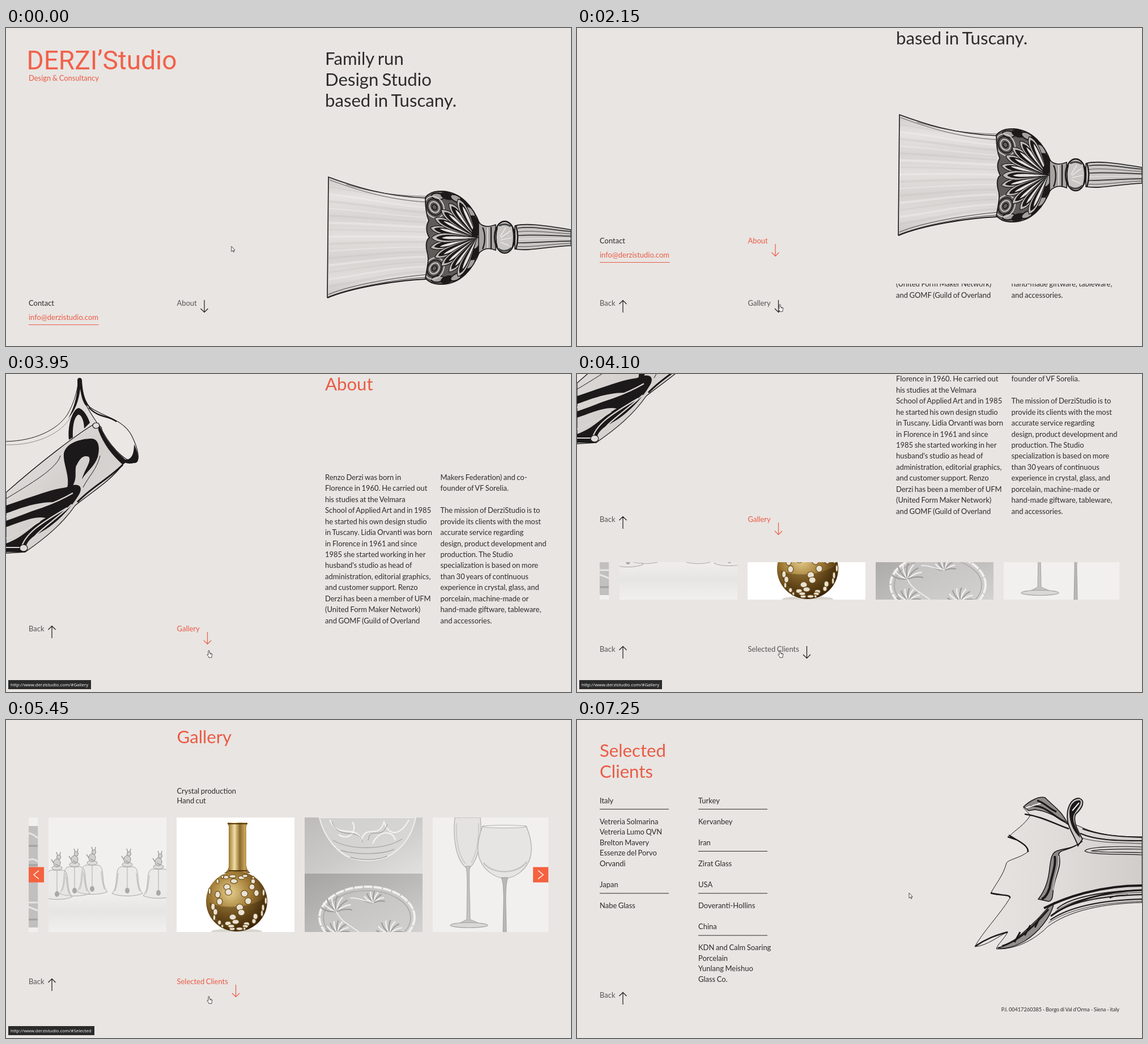
Recreate the animation shown at these times as an HTML page. Size 997 by 561 pixels, loop 7300 ms.

```html
<!DOCTYPE html>
<html lang="en">
<head>
<meta charset="utf-8">
<title>Design studio</title>
<style>
  html, body { margin: 0; width: 100%; height: 100%; overflow: hidden; background: #e9e5e2; }
  svg { display: block; }
  text { font-family: Lato, sans-serif; white-space: pre; word-spacing: -.06em; }
</style>
</head>
<body>
<svg id="stage" width="997" height="561" viewBox="0 0 997 561"></svg>
<script>
const W = 997, H = 561, LOOP = 7300;
const BG = '#e9e5e2', RED = '#ea5b45', DARK = '#2c2c2c', GREY = '#555', INK = '#1b1919', PALE = '#dedbd9';

// ---- markup helpers
const text = (x, y, lines, { size = 12.98, fill = DARK, lead = 19.46, more = '' } = {}) =>
  [].concat(lines).map((s, i) =>
    `<text x="${x}" y="${y + i * lead}" font-size="${size}" fill="${fill}" ${more}>${s}</text>`).join('');
const title = (x, lines, fill = RED) => text(x, 64.5, lines, { size: 31.15, fill, lead: 37.4 });
const shape = (d, fill = INK, stroke = 'none', w = 1) =>
  `<path d="${d}" fill="${fill}" stroke="${stroke}" stroke-width="${w}"/>`;
const line = (d, w = 1, stroke = INK) => shape(d, 'none', stroke, w);
const oval = (x, y, rx, ry, fill = 'none', stroke = 'none', w = 1, more = '') =>
  `<ellipse cx="${x}" cy="${y}" rx="${rx}" ry="${ry}" fill="${fill}" stroke="${stroke}" stroke-width="${w}" ${more}/>`;
const rect = (x, y, w, h, fill) => `<rect x="${x}" y="${y}" width="${w}" height="${h}" fill="${fill}"/>`;
const repeat = (n, f) => Array.from({ length: n }, (_, i) => f(i)).join('');
const gradient = (id, dir, ...stops) => `<linearGradient id="${id}" ${dir}>` +
  stops.map((c, i) => `<stop offset="${i / (stops.length - 1)}" stop-color="${c}"/>`).join('') + '</linearGradient>';
const DOWN = 'x2="0" y2="1"', ACROSS = '', DIAGONAL = 'x2="1" y2="1"';

const back = text(40, 490, 'Back', { fill: GREY }) + line('M81 502V480.5M74.5 487L81 480.5 87.5 487', 1.2, INK);
const link = (id, label, x) => `<g id="${id}">${text(301.5, 490, label, { fill: GREY })}` +
  line(`M${x} 480V501.5M${x - 6.5} 495L${x} 501.5 ${x + 6.5} 495`, 1.2) + '</g>';
const section = (id, body) => `<g id="${id}">${rect(0, 0, W, H, BG)}${body}</g>`;

// ---- glass pieces
function goblet() {
  const cup = 'M740 299C746 291 756 287 771 288C802 290 824 314 836 346V394C824 426 802 451 771 452C756 453 746 449 740 441C744 420 747 405 743 395C740 382 742 373 747 370C742 362 740 350 746 340C741 328 740 312 740 299Z';
  const petal = (a, len, w, fill, stroke = 'none') => `<g transform="translate(831 370) rotate(${a})">` +
    shape(`M0 0C${-len * .4} ${-w * .5} ${-len * .85} ${-w * 1.4} ${-len} 0C${-len * .85} ${w * 1.4} ${-len * .4} ${w * .5} 0 0Z`, fill, stroke, 1.2) + '</g>';
  // one half of the cut pattern, drawn again upside down for the other
  const half = repeat(8, i => {
    const a = -1.75 + i * .27, x = 768 + 62 * Math.sin(a + 1.65), y = 370 + 74 * Math.sin(a);
    return oval(x, y, 11, 5.5, i % 2 ? INK : '#a5a19f', INK, 2, `transform="rotate(${8 + i * 10} ${x} ${y})"`);
  }) + repeat(4, i => oval(756, 316, 4 + i * 4, 5 + i * 5, 'none', i % 2 ? '#d3d0ce' : INK, 1.8, 'transform="rotate(-30 756 316)"')) +
    repeat(5, i => {
      const a = 12 + i * 13, len = 84 - i * 2;
      return petal(a, len, 10, '#bdb9b7', INK) + petal(a, len * .92, 7, INK) + petal(a + 1.5, len * .8, 3, '#e2dfdd');
    });
  return shape('M569 263C610 278 665 297 742 300V443C690 445 610 458 567 476Z', 'url(#bowl)') +
    repeat(15, i => line(`M570 ${281 + i * 12.5}C620 ${286 + i * 11.6} 680 ${303 + i * 9.2} 740 ${308 + i * 8.7}`,
      2 + i % 3, i % 2 ? '#f1efed77' : '#bbb8b644')) +
    line('M567 476L569 263C610 278 665 297 742 300', 1.6) +
    line('M571 268C612 283 670 303 742 307M600 276C650 291 690 296 742 297', .8, '#444') +
    line('M567 476C610 458 690 445 742 443', 2) + line('M569 470C612 452 690 440 742 435M569 474C615 456 690 443 742 440', .9, '#333') +
    `<clipPath id="cup"><path d="${cup}"/></clipPath>` +
    `<g clip-path="url(#cup)">${shape(cup, '#5f5b59')}${half}<g transform="matrix(1 0 0 -1 0 740)">${half}</g>` +
    petal(0, 80, 11, '#bdb9b7', INK) + petal(0, 72, 7, INK) + petal(0, 62, 3.5, '#e2dfdd') + '</g>' + line(cup, 1.8) +
    shape('M834 342C840 351 850 352 864 347V392C850 386 840 391 834 398Z', '#a8a4a2', INK, 1.5) +
    line('M841 352C846 362 846 378 841 390M856 351V390', 2.2) + line('M850 352V388', 1.6, '#e6e3e1') +
    shape('M898 349C915 344 945 347 997 356V384C950 386 925 394 898 390Z', '#cac7c5', INK, 1.6) +
    repeat(6, i => line(`M903 ${353 + i * 6.5}C930 ${349 + i * 7.6} 960 ${356 + i * 5} 997 ${359 + i * 4.2}`, i % 2 ? .8 : 1.7, i === 3 ? '#f4f2f0' : '#333')) +
    oval(880, 369, 18, 28, '#c9c6c4', INK, 2.4) + line('M867 352Q862 369 867 387M894 353Q898 369 894 386', 2) +
    line('M868 389Q880 398 892 388M870 349Q880 343 891 350', 3, '#444') +
    line('M872 368L882 352M873 370L890 358M873 374L892 370M873 378L888 384', 1.2, '#f7f5f3') + line('M900 349C904 362 904 376 900 390', 2.4);
}

const wavyVase = () =>
  line('M0 155C50 154 90 135 108 108C120 88 126 65 128 48') + line('M0 161C55 162 98 140 114 112', .8, '#777') +
  shape('M112 152C112 120 124 80 131 52C136 85 150 96 165 108L166 126Z', PALE) +
  shape('M126 46C127 41 134 42 134 47C135 65 138 85 152 98C140 96 134 85 131 62C128 85 122 100 110 114C122 92 127 70 126 46Z') +
  shape('M111 152C108 125 118 98 128 96C138 98 146 115 148 122L138 132C138 118 132 106 127 108C120 112 117 130 118 148Z') +
  shape('M140 88C165 112 205 112 222 145C234 170 236 186 230 190C218 196 190 172 172 140C160 120 148 105 140 88Z', '#eae7e5', INK, 1.1) +
  line('M146 95C165 115 180 108 195 120', 2.4) +
  shape('M226 160C237 182 235 194 226 193C214 196 206 192 200 184C212 190 226 190 226 160Z') +
  shape('M160 122C130 138 60 192 0 245V352L34 350C70 325 100 300 122 268C150 245 185 225 208 193C190 175 172 150 168 130Z', 'url(#vase)', INK, 1.3) +
  shape('M163 122C172 145 185 165 214 190L206 196C188 180 172 160 163 135Z') + oval(159, 127, 6, 5, PALE, INK, 1.2) +
  shape('M102 176C106 158 130 150 152 150C164 152 166 166 162 182C156 200 140 210 134 222C138 205 152 190 146 182C136 178 130 186 125 196C121 200 124 214 122 222C120 232 114 240 106 244C116 220 100 196 102 176Z') +
  line('M206 196C180 222 150 236 126 262', 3) + line('M166 180C160 205 146 216 136 236M96 180C90 200 60 220 0 256', 1) +
  shape('M0 268C40 255 76 240 106 236C128 226 138 234 128 250C116 270 90 300 60 316C40 326 34 336 34 350H0V335C30 325 50 300 70 290C50 285 20 300 0 306V295C30 285 60 272 84 262C50 262 20 275 0 282Z') +
  line('M0 288C40 280 80 268 118 246M26 346C32 318 60 300 108 272M40 340C46 318 80 300 116 266', 2.2, '#d9d6d4') +
  line('M0 326C24 318 44 306 60 296M0 342H24', 2, '#d9d6d4') + oval(31, 343, 7, 6, PALE, INK, 1.2);

const leafVase = () =>
  shape('M820 137C805 140 790 148 788 155L800 168C790 185 772 195 764 204C775 212 797 220 795 233C780 244 762 246 758 252C752 275 738 290 730 306C745 310 765 308 764 314C745 345 715 375 702 400C725 398 745 380 760 374C755 385 742 395 740 404C765 405 800 395 830 365C870 335 930 324 997 322V206C950 206 920 202 892 190C880 184 870 182 864 180C845 165 830 150 820 137Z', 'url(#leaf)', INK, 1) +
  shape('M788 153C800 142 815 134 826 137C838 150 856 160 866 184C845 168 825 160 808 158L797 160Z', '#8f8b89', INK, 1.5) +
  line('M800 152C825 148 840 170 862 180M812 142C826 146 832 156 846 162', 3) + line('M792 155L818 147', 2, '#f5f3f1') +
  line('M790 166C820 170 840 182 868 192', 2.6) +
  shape('M866 180C862 155 872 138 886 138C898 142 892 155 880 166C874 178 884 196 892 210L884 222C878 205 870 196 866 180Z', '#c5c2c0', INK, 1.8) +
  shape('M869 166C868 148 880 140 888 142C892 150 880 158 876 170C874 184 886 196 888 208C876 196 870 184 869 166Z') + line('M874 160L886 146', 2, '#eee') +
  line('M762 203C775 212 797 220 796 233M730 305C745 310 765 307 764 314M760 206L775 211', 2.4) +
  shape('M892 214C870 232 856 226 850 236C856 258 846 270 842 290C838 306 842 318 832 320L814 316C828 298 832 280 834 262C836 244 838 232 850 230C864 226 876 226 892 214Z', '#8e8a88', INK, 1.5) +
  line('M843 240C846 258 836 278 834 296C830 308 826 314 820 316', 4) + line('M850 240C852 262 842 274 840 300', 1.2, '#e9e6e4') +
  shape('M742 402C770 396 790 372 812 352C824 340 830 330 842 322C836 350 812 376 790 390C772 400 756 405 742 402Z', '#918d8b', INK, 1.4) +
  line('M750 399C782 388 806 364 832 334M772 392L782 374M790 380L800 362M808 366L816 350', 3) +
  line('M703 399C722 386 738 380 760 374', 2.6) +
  line('M824 332C860 314 920 292 997 292', 4) + line('M836 346C870 320 930 302 997 300', 3) +
  repeat(6, i => line(`M${832 + i * 3} ${358 - i * 5}C870 ${332 - i * 4} 930 ${322 - i * 4} 997 ${320 - i * 4}`, .8 + i % 2, i === 2 ? '#f0eeec' : INK)) +
  line('M892 192C920 202 950 206 997 207M888 200C915 212 950 213 997 213', 2) + line('M890 208C925 218 960 216 997 218', .8) +
  line('M997 224C950 222 900 224 896 231C904 238 960 236 997 238M997 228C950 227 915 229 908 231C920 234 960 233 997 234', 1.2) +
  line('M940 314C955 306 965 312 972 308', 2);

// ---- gallery
const slide = (x, w, body) => `<svg x="${x}" y="196" width="${w}" height="202">${body}</svg>`;

function bells() {
  const bell = (x, y) => `<g transform="translate(${x} ${y})">` +
    shape('M-11 -23C-24 -20 -14 10 -27 24C-14 30 14 30 27 24C14 10 24 -20 11 -23Z', '#d9d8d740', '#a9a7a6', 1) +
    line('M0 -22V16M-16 -12C-18 4 -18 12 -22 20M16 -12C18 4 18 12 22 20', 1.2, '#b9b7b6') + oval(0, 19, 4, 5, '#aaa8a7') +
    oval(0, -27, 9, 4, '#dddcdb', '#9d9b9a') + oval(0, -36, 6, 7, '#d2d0cf', '#8f8d8c') + oval(3, -46, 3.5, 4, '#d2d0cf', '#8f8d8c') +
    line('M1 -49L-1 -55M5 -49L6 -55M-6 -36L-10 -42M-3 -34L4 -30', 1.4, '#9a9897') + '</g>';
  return rect(0, 0, 208, 202, '#f1f0ef') + rect(0, 130, 208, 72, 'url(#floor)') +
    bell(77, 107) + bell(46, 110) + bell(15, 116) + bell(139, 110) + bell(194, 114);
}

function bottle() {
  const jewels = [-60, -38, -17, 6, 28, 49, 68].map((lat, row) => repeat(6, i => {
    const wobble = Math.sin(row * 5 + i * 3) * .13;
    const a = lat * Math.PI / 180 + wobble, b = -1.3 + i * .52 + row % 2 * .26 + wobble;
    if (b > 1.45) return '';
    const squash = Math.max(.35, Math.cos(b));
    return oval(106 + 52 * Math.cos(a) * Math.sin(b), 148 + 50 * Math.sin(a), 6.2 * squash, 6 * Math.max(.45, Math.cos(a)), '#e9e2d2', '#6b4c1c', 1.2);
  })).join('');
  return rect(0, 0, 208, 202, '#fff') + oval(106, 201, 45, 5, '#d9d6d0') +
    shape('M90 9H125L123 16V84C124 92 127 95 130 98H84C90 95 92 90 92 84V16Z', 'url(#gold)') +
    line('M90 11H125', 2, '#5a3d10') + line('M92 94H124', 2, '#4a300b') +
    oval(106, 148, 54, 53, 'url(#ball)') + shape('M58 150C80 162 130 160 155 142C160 160 140 192 106 194C78 192 60 172 58 150Z', '#3a240866') + jewels;
}

function carved() {
  const flower = (x, y, r) => repeat(9, i => {
    const a = -2.9 + i * .35;
    return line(`M${x} ${y}Q${x + r * .6 * Math.cos(a - .3)} ${y + r * .6 * Math.sin(a - .3)} ${x + r * Math.cos(a)} ${y + r * Math.sin(a)}`, 2.2, i % 2 ? '#f2f1f0' : '#9e9c9b');
  });
  return rect(0, 0, 208, 100, 'url(#upper)') + rect(0, 99, 208, 103, 'url(#lower)') +
    shape('M26 0C34 34 58 64 84 72C104 78 128 76 144 70C172 58 190 30 196 0Z', '#dddcdb99', '#f0efee', 2) +
    line('M50 40C80 58 140 58 172 38M64 58C90 66 136 66 158 56M80 70C100 76 128 76 146 68', 1.4, '#aaa8a7') +
    line('M44 4C60 40 90 10 100 40C108 10 130 40 140 8C150 36 170 30 184 4M60 30C80 44 94 20 84 8M120 46C130 22 156 22 160 40', 2.2, '#f4f3f2') +
    line('M48 8C64 44 94 14 102 44M112 40C116 14 136 42 146 12', 1, '#959392') +
    oval(110, 176, 84, 54, '#d2d1d088', '#f1f0ef', 4, 'stroke-dasharray="15 2"') + oval(110, 177, 77, 48, 'none', '#a09e9d', 1.2) +
    flower(56, 166, 28) + flower(122, 150, 20) + flower(58, 204, 22) + flower(150, 205, 24) + line('M56 166C64 184 80 190 96 202M122 150C100 146 90 140 80 142', 2, '#ecebea');
}

const stemware = () => rect(0, 0, 204, 202, '#f1f0ef') +
  shape('M39 0C35 40 42 74 58 88H66C80 74 88 40 84 0Z', '#e4e3e2', '#b0aeac', 1.2) + line('M42 10C40 46 48 70 58 82M81 10C82 46 76 66 68 80', 2, '#cfcdcb') +
  shape('M58 86C62 96 61 120 60 180L40 190H90L66 180C65 120 63 96 66 86Z', '#c5c3c1', '#a5a3a1') + oval(64, 190, 33, 4.5, '#dad8d6', '#a3a19f', 1.2) +
  shape('M88 15C80 36 76 58 84 76C92 94 108 104 122 107H132C148 104 164 92 171 74C178 54 172 32 165 15Z', '#e6e5e4', '#aeacaa', 1.2) +
  oval(126.5, 16, 38.5, 2.5, '#f0efee', '#b5b3b1') + line('M90 80C104 100 148 102 166 78', 2.4, '#c3c1bf') +
  shape('M121 106C127 118 125 150 124 202H130C129 150 127 118 133 106Z', '#bab8b6', '#9d9b99');

const shelf = () => rect(0, 0, 16.5, 202, '#f1f0ef') + rect(0, 15, 16.5, 179, '#c2c0bf') +
  line('M0 28C8 28 12 34 16 36M0 75C8 72 12 74 16 78M0 92H16M0 150H16M0 158L16 164', 3, '#e6e5e4') + line('M0 50H16M0 84H16M0 180H16', 3, '#a3a19f');

const button = (x, tip) => rect(x, 283.5, 27, 27, '#f4623f') + line(`M${x + 13.5 - tip} 289.5L${x + 13.5 + tip} 297L${x + 13.5 - tip} 304.5`, 1.4, '#fff');

// ---- clients: rows share one grid, a row starting with a bracket is an underlined heading
const clients = (x, rows) => rows.map((s, i) => {
  const y = 146.5 + i * 18.56;
  return s[0] === '[' ? text(x, y, s.slice(1)) + rect(x, y + 10.3, 122, 1, DARK) : text(x, y, s);
}).join('');

const about = [
  ['Renzo Derzi was born in', 'Florence in 1960. He carried out', 'his studies at the Velmara', 'School of Applied Art and in 1985',
    'he started his own design studio', 'in Tuscany. Lidia Orvanti was born', 'in Florence in 1961 and since', '1985 she started working in her',
    "husband's studio as head of", 'administration, editorial graphics,', 'and customer support. Renzo', 'Derzi has been a member of UFM',
    '(United Form Maker Network)', 'and GOMF (Guild of Overland'],
  ['Makers Federation) and co-', 'founder of VF Sorelia.', '', 'The mission of DerziStudio is to', 'provide its clients with the most',
    'accurate service regarding', 'design, product development and', 'production. The Studio', 'specialization is based on more',
    'than 30 years of continuous', 'experience in crystal, glass, and', 'porcelain, machine-made or', 'hand-made giftware, tableware,', 'and accessories.']
];

const stage = document.getElementById('stage');
stage.innerHTML = '<defs>' +
  gradient('bowl', DOWN, '#cfccca', '#e5e2e0', '#d8d5d3', '#e2dfdd', '#d6d3d1', '#dfdcda', '#c9c6c4') +
  gradient('vase', DIAGONAL, '#e6e3e1', '#d2cfcd', '#e2dfdd') + gradient('leaf', ACROSS, '#e7e4e2', '#dfdcda', '#d0cdcb') +
  gradient('floor', DOWN, '#f1f0ef', '#e6e5e4', '#f1f0ef') + gradient('upper', DIAGONAL, '#bdbcba', '#cccac9', '#e2e1e0') +
  gradient('lower', DIAGONAL, '#a5a4a2', '#bbb9b8', '#d3d2d1') +
  gradient('gold', ACROSS, '#4a300b', '#a8853e', '#f1dfa4', '#8d6a2a', '#c9a65c', '#3f2808') +
  '<radialGradient id="ball" cx=".4" cy=".35" r=".65"><stop stop-color="#e6cf8e"/><stop offset=".5" stop-color="#a27c35"/><stop offset="1" stop-color="#3d2708"/></radialGradient></defs>' +
  section('clients', title(40, ['Selected', 'Clients']) +
    clients(40, ['[Italy', '', 'Vetreria Solmarina', 'Vetreria Lumo QVN', 'Brelton Mavery', 'Essenze del Porvo', 'Orvandi', '', '[Japan', '', 'Nabe Glass']) +
    clients(214, ['[Turkey', '', 'Kervanbey', '', '[Iran', '', 'Zirat Glass', '', '[USA', '', 'Doveranti-Hollins', '', '[China', '',
      'KDN and Calm Soaring', 'Porcelain', 'Yunlang Meishuo', 'Glass Co.']) + back + leafVase() +
    text(957, 514, "P.I. 00417260385 - Borgo di Val d'Orma - Siena - italy", { size: 9.1, more: 'text-anchor="end"' })) +
  section('gallery', title(301.5, 'Gallery') + text(301.5, 153.5, ['Crystal production', 'Hand cut'], { lead: 17.8 }) +
    slide(40, 16.5, shelf()) + slide(75, 208, bells()) + slide(301, 208, bottle()) + slide(527, 208, carved()) + slide(753, 204, stemware()) +
    button(40, -4.5) + button(930, 4.5) + back + link('toClients', 'Selected Clients', 405.5)) +
  section('about', title(563, 'About') + text(563, 222.8, about[0]) + text(766.5, 222.8, about[1]) + wavyVase() + back + link('toGallery', 'Gallery', 355.5)) +
  section('home', text(36.5, 73, 'DERZI’Studio', { size: 46, fill: '#f0614a', more: 'style="font-family:Roboto,sans-serif"' }) +
    text(40, 93, 'Design &amp; Consultancy', { fill: RED }) + title(563, ['Family run', 'Design Studio', 'based in Tuscany.'], DARK) + goblet() +
    text(40, 490, 'Contact') + text(40, 515, 'info@derzistudio.com', { fill: RED }) + rect(40, 523, 123.5, 1, RED) + link('toAbout', 'About', 350)) +
  `<g id="status"><rect x="4" y="540" height="16" fill="#2b2b2b"/>${text(8, 551, '', { size: 7.9, fill: '#f2f2f2', more: 'style="font-family:Noto Sans,sans-serif"' })}</g>
  <path id="arrow" d="M0 0V9.3L2.2 7.4 3.7 10.4 5 9.8 3.6 6.9H6.2Z" fill="#fff" stroke="#222" stroke-width=".8"/>
  <path id="hand" d="M-1 7.4V.6a1 1 0 0 1 2 0V4.2L5 5.2Q6 5.6 5.8 7L5 10V12.2H-.2V10.8L-3 7.6C-3.4 6.4-2.2 6.2-1 7.4ZM2.6 4.8V6.6M4 5.2V6.8" fill="#fff" stroke="#222" stroke-width=".8"/>`;

// ---- motion
const $ = id => document.getElementById(id);
const ramp = (t, start, length) => Math.min(1, Math.max(0, (t - start) / length));
const ease = p => p < .5 ? 4 * p ** 3 : 1 - 4 * (1 - p) ** 3;
const move = (el, x, y) => el.setAttribute('transform', `translate(${x} ${y})`);
const toRed = (shade, p) => `rgb(${[234, 91, 69].map(c => Math.round(shade + (c - shade) * p))})`;
const pointer = [[0, 398, 385], [200, 362, 419], [450, 362, 419], [500, 359, 434], [600, 359, 434], [850, 358, 488], [7249, 358, 488], [7250, 586, 305], [LOOP, 586, 305]];

function hover(id, p) {
  const arrow = $(id).querySelector('path');
  $(id).querySelector('text').setAttribute('fill', toRed(85, p));
  arrow.setAttribute('stroke', toRed(27, p));
  move(arrow, 0, 11 * p);
}

function showStatus(page, width, opacity) {
  const el = $('status');
  el.setAttribute('opacity', opacity);
  el.querySelector('rect').setAttribute('width', width);
  el.querySelector('text').textContent = 'http://www.derzistudio.com/#' + page;
}

function frame(now) {
  const t = now % LOOP;
  const [first, second, third] = [['home', 1895], ['about', 3774], ['gallery', 5297]].map(([id, start]) => {
    const y = Math.round(H * ease(ramp(t, start, 700)));
    move($(id), 0, -y);
    return y;
  });
  hover('toAbout', ramp(t, 850, 250));
  hover('toGallery', ramp(t, 3630, 220));
  hover('toClients', ramp(t, 4370, 220));

  // the bar goes once the page edge has passed the pointer
  if (t < 3000) showStatus('About', 139, first > 67 ? 0 : ramp(t, 1050, 200));
  else if (t < 4400) showStatus('Gallery', 146, ramp(t, 3680, 200));
  else showStatus('Selected', 152, third > 67 ? 0 : 1);

  const i = pointer.findIndex(p => p[0] > t), [t0, x0, y0] = pointer[i - 1], [t1, x1, y1] = pointer[i];
  const p = (t - t0) / (t1 - t0), onLink = t >= 800 && t < 7250;
  for (const id of ['arrow', 'hand']) {
    move($(id), x0 + (x1 - x0) * p, y0 + (y1 - y0) * p);
    $(id).setAttribute('visibility', (id === 'hand') === onLink ? 'visible' : 'hidden');
  }
  requestAnimationFrame(frame);
}
requestAnimationFrame(frame);
</script>
</body>
</html>
```
